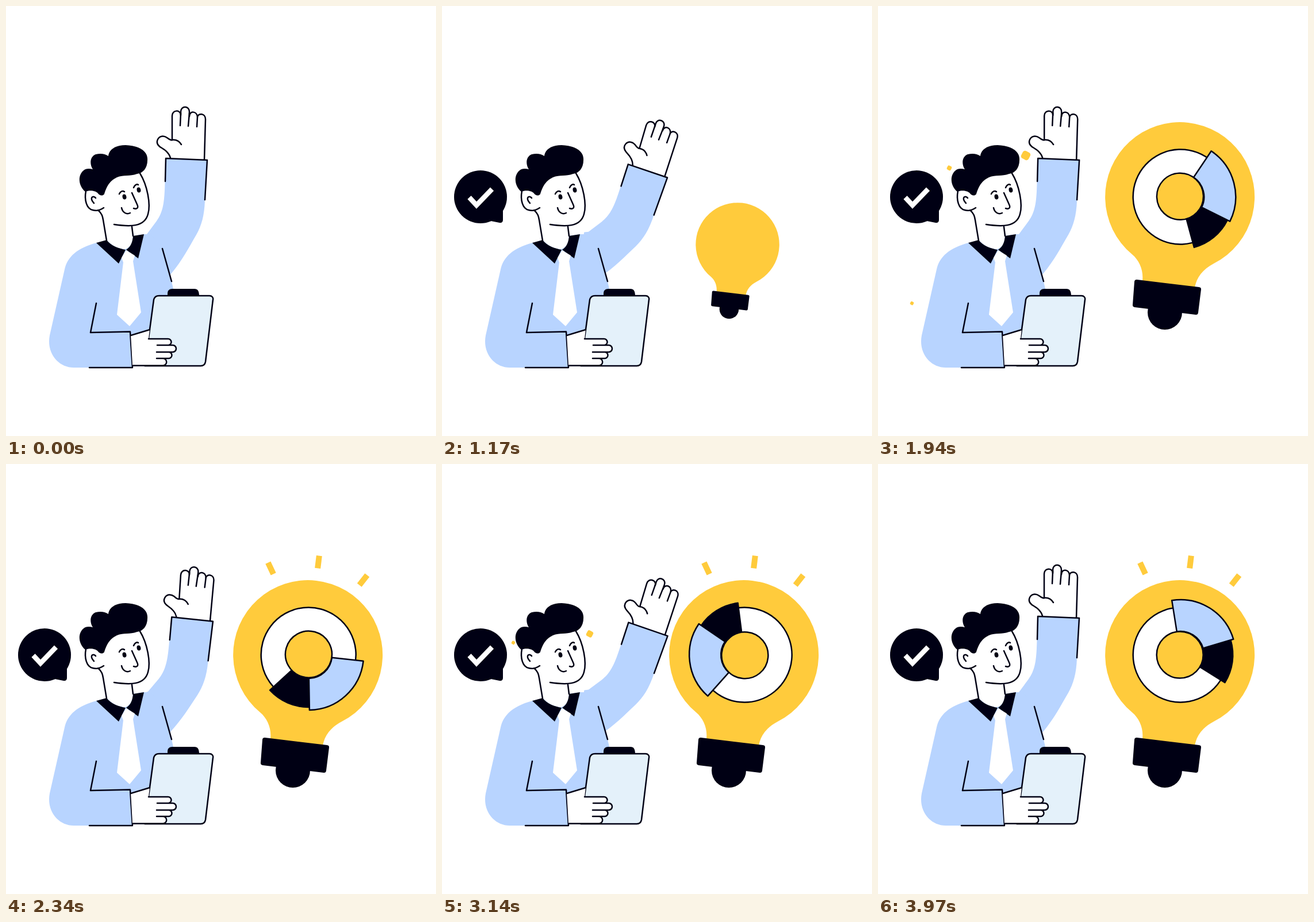
An HTML page for the animation above (4000 ms loop, 748 px wide and 748 px high).

```html
<!DOCTYPE html>
<html lang="en">
<head>
<meta charset="utf-8">
<title>Waving man and idea bulb</title>
<style>
  html, body { margin: 0; width: 100%; height: 100%; overflow: hidden; background: #fff; }
  svg { display: block; width: 100vw; height: 100vh; }
  .dark { fill: #000014; }
  .blue { fill: #b8d4ff; }
  .white { fill: #fff; }
  .gold { fill: #ffcb3c; }
  .line { stroke: #000014; stroke-width: 2.5; stroke-linecap: round; stroke-linejoin: round; }
  .none { fill: none; }
</style>
</head>
<body>
<svg viewBox="0 0 748 748">
  <g id="dots" class="gold"></g>

  <g id="arm">
    <path class="white line" d="M286 264C284 257 278 251 271 247C264 243 261 238 264 232C267 226 274 225 280 229C284 232 286 234 289 233L289 191C289 180 304 180 304 190L304 184C304 173 319 173 319 184L319 192C319 182 332 182 333 193C334 186 347 186 347 197L345 268"/>
    <path class="none line" d="M289 233C297 232 302 236 305 241M304 186L303 208M319 186L317 209M333 193L332 210"/>
    <path class="blue" d="M245 397L262 374C272 360 275 345 276 320L278 265L350 268L346 338C345 365 340 382 331 398C317 422 307 442 287 466L265 470L240 420L238 400Z"/>
    <path class="none line" d="M277 305L278 265L350 268L346 337"/>
  </g>

  <g id="man">
    <path class="blue" d="M157 412C124 421 107 436 102 458L76 573C70 605 92 629 118 629H220L217 572L250 562L292 496L288 479L274 422L252 397H240L221 400Z"/>
    <path class="white" d="M139 322C136 340 141 354 151 355L163 357L175 407C185 418 198 423 207 423C217 420 221 410 221 399L219 383C235 382 245 374 247 362C252 345 246 312 233 291L190 290Z"/>
    <path class="none line" d="M233 291C246 312 252 345 247 362C241 385 215 384 188 380M139 322C136 337 140 353 151 355C158 357 164 355 170 351M160 355C167 361 168 366 169 372L175 408M219 384L221 400M156 334C154 331 150 331 149 334C148 338 151 340 153 343"/>
    <path class="none line" d="M197 327C199 322 203 321 206 323M222 316C224 311 228 309 230 311M219 325L228 345C231 351 228 354 222 352M201 351C203 360 210 363 216 360"/>
    <g id="eyes" class="dark">
      <ellipse cx="206" cy="332" rx="3.4" ry="4.5" transform="rotate(-12 206 332)"/>
      <ellipse cx="231" cy="320" rx="3.4" ry="4.5" transform="rotate(-12 231 320)"/>
    </g>
    <path class="dark" d="M138 323C126 313 124 295 135 286C138 283 144 282 151 284C145 275 146 262 156 258C165 256 172 257 178 261C179 250 190 242 208 242C230 243 245 251 246 265C247 282 238 291 228 292C215 297 205 293 193 298C178 305 174 318 171 327C168 331 163 330 160 326C156 321 145 320 138 323Z"/>
    <path class="dark" d="M157 412L175 407C183 418 198 422 208 424L196 448ZM221 400L240 397L230 439L209 424C218 418 220 410 221 400Z"/>
    <path class="white" d="M209 425L201 438L204 446L193 537L215 557L235 533L221 444L224 434Z"/>
    <path class="none line" d="M272 422L288 479M157 517L147 568L216 566.500L220 629H145"/>
    <path class="dark" d="M281 505V500C281 495 284 492 289 492H328C333 492 336 495 336 505Z"/>
    <path class="line" fill="#e4f1fa" d="M266 504H354C358 504 361 507 360 511L347 619C346 624 343 626 339 626H241.500L257 511C258 507 261 504 266 504Z"/>
    <path class="white" d="M217 572L250 562L248 579H282a5.5 5.5 0 0 1 0 11H290a6 6 0 0 1 0 12H283a5.5 5.5 0 0 1 0 11H273a6 6 0 0 1 0 12H220Z"/>
    <path class="none line" d="M217 573L250 563M248 579H282a5.5 5.5 0 0 1 0 11H263M282 590H290a6 6 0 0 1 0 12H262M283 602a5.5 5.5 0 0 1 0 11H262M273 613a6 6 0 0 1 0 12.5H221"/>
  </g>

  <g id="badge">
    <path class="dark" d="M106 350V372Q106 378 100 377L80 373Z"/>
    <circle class="dark" cx="67" cy="332" r="46"/>
    <path class="none" stroke="#fff" stroke-width="8.500" d="M47.500 333L60 346.500L87 318.500"/>
  </g>

  <g id="bulb">
    <path class="gold" d="M442 432A130 130 0 1 1 584 448C565 458 554 472 551 490L460 478C462 460 455 443 442 432Z"/>
    <path class="dark" stroke="#000014" stroke-width="8" stroke-linejoin="round" d="M450 480L558 493L553 533L447 520Z"/>
    <circle class="dark" cx="499" cy="533" r="30"/>
  </g>

  <g id="chart">
    <circle class="white line" r="82.500"/>
    <path id="darkSlice" class="dark line"/>
    <path id="blueSlice" class="blue line"/>
    <circle class="gold line" cx="-1" r="40.500"/>
  </g>

  <g id="rays" class="gold">
    <rect x="-5" y="-11" width="10" height="22" transform="translate(460.500 181.500) rotate(-25)"/>
    <rect x="-5" y="-11" width="10" height="22" transform="translate(543.500 170.500) rotate(7)"/>
    <rect x="-5" y="-11" width="10" height="22" transform="translate(621.500 202) rotate(38)"/>
  </g>
</svg>
<script>
const LOOP = 4000, WAVE = 2000, BURST = LOOP / 3;
const $ = id => document.getElementById(id);
const clamp = v => Math.min(1, Math.max(0, v));
const ramp = (t, from, to) => clamp((t - from) / (to - from));
const easeOut = p => 1 - (1 - p) ** 2;
const easeInOut = p => p * p / (p * p + (1 - p) ** 2);
const move = (id, transform) => $(id).setAttribute('transform', transform);
const scaleAt = (id, x, y, sx, sy = sx) =>
  move(id, `translate(${x} ${y}) scale(${sx} ${sy}) translate(${-x} ${-y})`);

// Ring segment, angles in degrees clockwise from the top
function slice(from, to, outer, inner = 41) {
  const at = (deg, r) => {
    const a = deg * Math.PI / 180;
    return `${r * Math.sin(a)} ${-r * Math.cos(a)}`;
  };
  return `M${at(from, outer)}A${outer} ${outer} 0 0 1 ${at(to, outer)}` +
    `L${at(to, inner)}A${inner} ${inner} 0 0 0 ${at(from, inner)}Z`;
}
$('blueSlice').setAttribute('d', slice(-9, 73.5, 96));
$('darkSlice').setAttribute('d', slice(73.5, 122, 91));

// Rising squares: birth and end within a burst, first height, speed and growth per ms
const dots = [
  { x: 257, y: 403, born: 70, dies: 870, speed: .266, growth: .0268 },
  { x: 124, y: 399, born: 70, dies: 870, speed: .218, growth: .0143 },
  { x: 59, y: 530, born: 500, dies: 970, speed: .12, growth: .054 },
  { x: 181.5, y: 252, born: 10, dies: 400, speed: .19, growth: .05 }
];
for (const dot of dots) {
  dot.el = document.createElementNS('http://www.w3.org/2000/svg', 'rect');
  for (const [key, value] of Object.entries({ x: -.5, y: -.5, width: 1, height: 1, rx: .3 }))
    dot.el.setAttribute(key, value);
  $('dots').append(dot.el);
}

function draw(t) {
  const wave = 1 - Math.abs(t % WAVE / (WAVE / 2) - 1);
  move('arm', `rotate(${17.1 * easeInOut(wave)} 265 429)`);

  for (const { el, x, y, born, dies, speed, growth } of dots) {
    const now = t % BURST, age = now - born;
    const size = now > born && now < dies ? age * growth : 0;
    el.setAttribute('transform', `translate(${x} ${y - age * speed}) rotate(28) scale(${size})`);
    el.setAttribute('opacity', 1 - ramp(now, dies - 40, dies));
  }

  scaleAt('eyes', 218, 326, 1, clamp(Math.abs(t - 1433) / 80 - .4));
  scaleAt('badge', 67, 332, easeOut(ramp(t, 500, 700)));
  scaleAt('bulb', 500, 520, easeOut(ramp(t, 1055, 1400)));

  const size = easeOut(ramp(t, 1300, 1560));
  const turn = 360 * ramp(t, 1667, 3967);
  move('chart', `translate(526.2 332) rotate(${turn}) scale(${size})`);

  const flash = ramp(t, 1467, 1667) - ramp(t, 1667, 1867) + ramp(t, 2067, 2267);
  $('rays').setAttribute('opacity', flash);
}

const start = performance.now();
function tick() {
  draw((performance.now() - start) % LOOP);
  requestAnimationFrame(tick);
}
tick();
</script>
</body>
</html>
```
